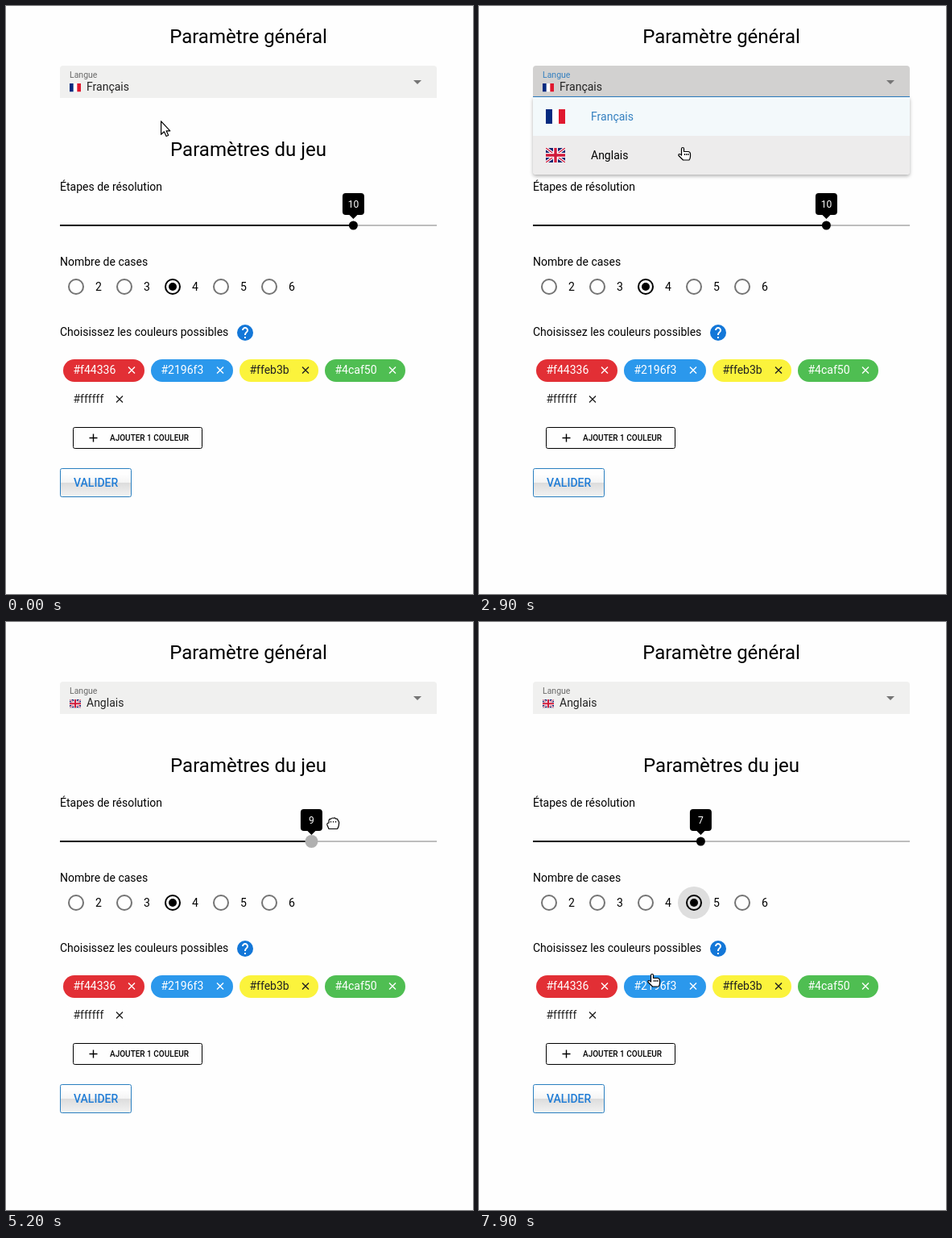
An HTML page that plays this animation: 580 by 729 pixels, repeating every 8000 ms.

```html
<!DOCTYPE html>
<html lang="fr">
<head>
<meta charset="utf-8">
<style>
  html, body { margin: 0; width: 100%; height: 100%; overflow: hidden; background: #fefefe; }
  svg { display: block; font: 14px Roboto, sans-serif; }
  .title { font-size: 24px; text-anchor: middle; }
  .small { font-size: 10.5px; }
  .strong { font-weight: 500; }
  #panel { filter: drop-shadow(0 2px 2px rgba(0, 0, 0, .3)); transform-origin: 301px 113px; }
  #cursor > * { fill: #fff; stroke: #000; stroke-width: 1.2; stroke-linejoin: round; }
  #cursor .open { fill: none; }
</style>
</head>
<body>
<svg width="580" height="729" viewBox="0 0 580 729">
  <defs>
    <symbol id="french" viewBox="0 0 24 18" preserveAspectRatio="none">
      <path fill="#fff" d="M0 0h24v18H0z"/>
      <path fill="#052a80" d="M0 0h8v18H0z"/>
      <path fill="#e0192f" d="M16 0h8v18h-8z"/>
    </symbol>
    <symbol id="british" viewBox="0 0 24 18" preserveAspectRatio="none">
      <path fill="#17246f" d="M0 0h24v18H0z"/>
      <path stroke="#fff" stroke-width="3.6" d="M0 0 24 18M24 0 0 18"/>
      <path stroke="#d0193a" stroke-width="1.3" d="M0 0 24 18M24 0 0 18"/>
      <path stroke="#fff" stroke-width="6" d="M12 0v18M0 9h24"/>
      <path stroke="#d0193a" stroke-width="3.4" d="M12 0v18M0 9h24"/>
    </symbol>
    <linearGradient id="shine" x2="0" y2="1">
      <stop offset=".2" stop-color="#fefefe"/>
      <stop offset=".5" stop-color="#f4f4f4"/>
      <stop offset=".5" stop-color="#dcdcdc"/>
      <stop offset="1" stop-color="#f3f3f3"/>
    </linearGradient>
  </defs>

  <text class="title" x="301" y="46">Paramètre général</text>
  <text class="title" x="301" y="186">Paramètres du jeu</text>

  <path id="field" d="M67 114V78q0-4 4-4h460q4 0 4 4v36z"/>
  <path id="hoverLine" fill="#858585" d="M67 113h468v1H67z"/>
  <rect id="focusLine" y="112" height="2" fill="#2d7fc4"/>
  <text id="label" class="small" x="79" y="89">Langue</text>
  <use id="flag" x="79" y="96" width="14" height="10.5"/>
  <text id="language" x="100" y="105" fill="#222"></text>
  <path fill="#757575" d="M506 92h10l-5 5z"/>

  <text x="67" y="229">Étapes de résolution</text>
  <path fill="#bdbdbd" d="M67 271h468v2H67z"/>
  <rect id="filled" x="67" y="271" height="2"/>
  <g id="slider">
    <circle id="halo" cy="272" r="15" fill="#000" opacity=".22"/>
    <circle id="thumb" cy="272"/>
    <path d="M-9.5 232h19q4 0 4 4v19q0 4-4 4H5l-5 5-5-5h-4.500q-4 0-4-4v-19q0-4 4-4z"/>
    <text id="steps" y="250" fill="#fff" font-size="12" text-anchor="middle"></text>
  </g>

  <text x="67" y="322">Nombre de cases</text>
  <g id="radios"></g>

  <text x="67" y="409">Choisissez les couleurs possibles</text>
  <circle cx="297" cy="405" r="10" fill="#1377d8"/>
  <path fill="#fff" transform="translate(285 393)" d="M13 19h-2v-2h2zm2.070-7.750-.9.920C13.450 12.900 13 13.500 13 15h-2v-.5c0-1.100.450-2.100 1.170-2.830l1.240-1.260c.370-.360.590-.860.590-1.410 0-1.100-.9-2-2-2s-2 .9-2 2H8c0-2.210 1.790-4 4-4s4 1.790 4 4c0 .880-.360 1.680-.930 2.250z"/>
  <g id="chips"></g>

  <rect x="83.500" y="522.500" width="160" height="26" rx="2" fill="#fefefe" stroke="#000"/>
  <path stroke="#000" stroke-width="1.400" d="M103.500 535.500h10M108.500 530.500v10"/>
  <text class="strong" x="129" y="539" font-size="10">AJOUTER 1 COULEUR</text>
  <rect x="67.500" y="573.500" width="88" height="35" rx="2" fill="url(#shine)" stroke="#2a7fc0"/>
  <text class="strong" x="84" y="596" fill="#1f7cd6">VALIDER</text>

  <g id="panel">
    <path fill="#fefefe" d="M67 113h468v92q0 4-4 4H71q-4 0-4-4z"/>
    <path fill="#f3f9fb" d="M67 113h468v48H67z"/>
    <path id="option" fill="#edecec" d="M67 161h468v44q0 4-4 4H71q-4 0-4-4z"/>
    <use href="#french" x="83" y="128" width="24" height="18"/>
    <use href="#british" x="83" y="176" width="24" height="18"/>
    <text x="139" y="142" fill="#3580c0">Français</text>
    <text x="139" y="190">Anglais</text>
  </g>

  <g id="cursor">
    <path id="arrow" d="M.6.800v16.500l3.800-3.500 2.700 5.700 2.600-1.200-2.600-5.500h4.700z"/>
    <g id="hand">
      <path d="M4.500 10V2q0-1.500 1.500-1.500T7.500 2v3.500h5.500q2.500.5 2.500 3v3q0 2.500-1.500 4.500H6.500L1 10.500q-.5-1.800 1-2 1.200 0 2.500 1.500z"/>
      <path class="open" d="M8.500 8v2M10.700 8v2M12.900 8v2"/>
    </g>
    <path id="grab" d="M6.500 18.500 1 12q-1-2 .5-2.500t3.500 2L3 4.500q-.2-1.700 1.200-1.800T6 4l1 4V2q.2-1.500 1.500-1.500T10 2v6l1-5q.5-1.500 1.700-1.200T14 3.500L13.500 9l1.500-3.500q.8-1.200 1.900-.7T17.500 6.500L16 14l-1.500 4.500z"/>
    <g id="fist">
      <path d="M3 14.500 1 10q-.8-3 2-3V4q.3-2 2.500-1.800Q6.500.5 8.500 1.200q2-.8 3 .8 2.500-.3 2.700 2Q16 5 15.500 8q0 4-2 6.500z"/>
      <path class="open" d="M5.500 5v1.500M8.500 5v1.500M11.500 5v1.500"/>
    </g>
  </g>
</svg>
<script>
const $ = id => document.getElementById(id);
const set = (id, attrs) => {
  for (const name in attrs) $(id).setAttribute(name, attrs[name]);
};
const show = (id, on) => $(id).style.display = on ? '' : 'none';
const ramp = (t, from, to) => Math.min(1, Math.max(0, (t - from) / (to - from)));
const latest = (t, steps) => steps.findLast(([start]) => t >= start)[1];

const radioX = value => 87 + 60 * (value - 2);
$('radios').innerHTML =
  `<circle id="ripple" cx="${radioX(5)}" cy="348" fill="#dedede"/>` +
  [2, 3, 4, 5, 6].map(value => `
    <circle id="ring${value}" cx="${radioX(value)}" cy="348" r="9" fill="none" stroke-width="2"/>
    <circle id="dot${value}" cx="${radioX(value)}" cy="348"/>
    <text x="${radioX(value) + 24}" y="353">${value}</text>`).join('');

// left, top, width, fill, ink, caption
$('chips').innerHTML = [
  [71, 438, 101, '#e22f35', '#fff', '#f44336'],
  [180, 438, 102, '#2b98ec', '#fff', '#2196f3'],
  [290, 438, 98, '#fbf33c', '#222', '#ffeb3b'],
  [396, 438, 100, '#4fbe52', '#fff', '#4caf50'],
  [71, 474, 86, '#fefefe', '#222', '#ffffff']
].map(([x, y, width, fill, ink, caption]) => `
  <rect x="${x}" y="${y}" width="${width}" height="28" rx="14" fill="${fill}"/>
  <text x="${x + 12.5}" y="${y + 18}" fill="${ink}">${caption}</text>
  <path stroke="${ink}" stroke-width="1.4" d="M${x + width - 20} ${y + 9.500}l8 8m0-8l-8 8"/>`).join('');

// time, x, y
const path = [
  [0, 192, 142], [1000, 192, 142], [1400, 264, 101], [2600, 264, 101],
  [2900, 247, 175], [3200, 247, 175], [3500, 436, 238], [3700, 436, 238],
  [4200, 428, 251], [4300, 428, 251], [4700, 430, 243], [4800, 430, 243],
  [5200, 398, 242], [5500, 270, 246], [5600, 270, 246], [6200, 152, 340],
  [6300, 152, 340], [6800, 261, 344], [7400, 261, 344], [7900, 209, 436], [8000, 209, 436]
];
const shapes = [
  [0, 'arrow'], [1300, 'hand'], [3300, 'arrow'], [3900, 'grab'], [4500, 'fist'],
  [5700, 'grab'], [5800, 'arrow'], [6100, 'hand'], [7600, 'arrow'], [7900, 'hand']
];

function drawCursor(t) {
  const next = path.findIndex(([time]) => time > t);
  const [t0, x0, y0] = path[next - 1], [t1, x1, y1] = path[next];
  const k = ramp(t, t0, t1);
  set('cursor', { transform: `translate(${Math.round(x0 + (x1 - x0) * k)} ${Math.round(y0 + (y1 - y0) * k)})` });
  const shape = latest(t, shapes);
  for (const id of ['arrow', 'hand', 'grab', 'fist']) show(id, id === shape);
}

function drawSelect(t) {
  const focused = t >= 1900 && t < 3600;
  const english = t >= 3200;
  set('field', { fill: latest(t, [[0, '#f0f0ef'], [1300, '#e3e2e1'], [2200, '#d2d1d0'], [3300, '#dddcdb'], [3600, '#f0f0ef']]) });
  set('label', { fill: focused ? '#3580c0' : '#6a6a6a' });
  show('hoverLine', t >= 1300 && t < 3600);
  const half = t >= 2100 && t < 3600 ? 2 + 232 * ramp(t, 2100, 2300) : 0;
  set('focusLine', { x: 301 - half, width: half * 2 });
  set('flag', { href: english ? '#british' : '#french' });
  $('language').textContent = english ? 'Anglais' : 'Français';

  const opening = ramp(t, 2100, 2300);
  show('panel', t >= 2200 && t < 3300);
  $('panel').style.opacity = opening * (1 - ramp(t, 3100, 3300));
  $('panel').style.transform = `scaleY(${.8 + .2 * opening})`;
  show('option', t >= 2900);
}

function drawSlider(t) {
  const value = latest(t, [[0, 10], [5100, 9], [5400, 8], [5500, 7]]);
  const x = 67 + 52 * (value - 3);
  const dragging = t >= 4900 && t < 5700;
  set('filled', { width: x - 67 });
  set('slider', { transform: `translate(${x + .400} 0)` });
  show('halo', t >= 4100 && t < 4900);
  set('thumb', dragging ? { r: 8, fill: '#b0b0b0' } : { r: 5.5, fill: '#000' });
  $('steps').textContent = value;
}

function drawRadios(t) {
  const change = ramp(t, 7100, 7300);
  for (let value = 2; value <= 6; value++) {
    const amount = value === 4 ? 1 - change : value === 5 ? change : 0;
    set('ring' + value, { stroke: amount > .4 ? '#000' : '#747474' });
    set('dot' + value, { r: 5 * amount });
  }
  set('ripple', { r: 20 * ramp(t, 7100, 7400) });
}

function frame(now) {
  const t = Math.floor(now % 8000 / 100) * 100;
  drawSelect(t);
  drawSlider(t);
  drawRadios(t);
  drawCursor(t);
  requestAnimationFrame(frame);
}
frame(0);
</script>
</body>
</html>
```
